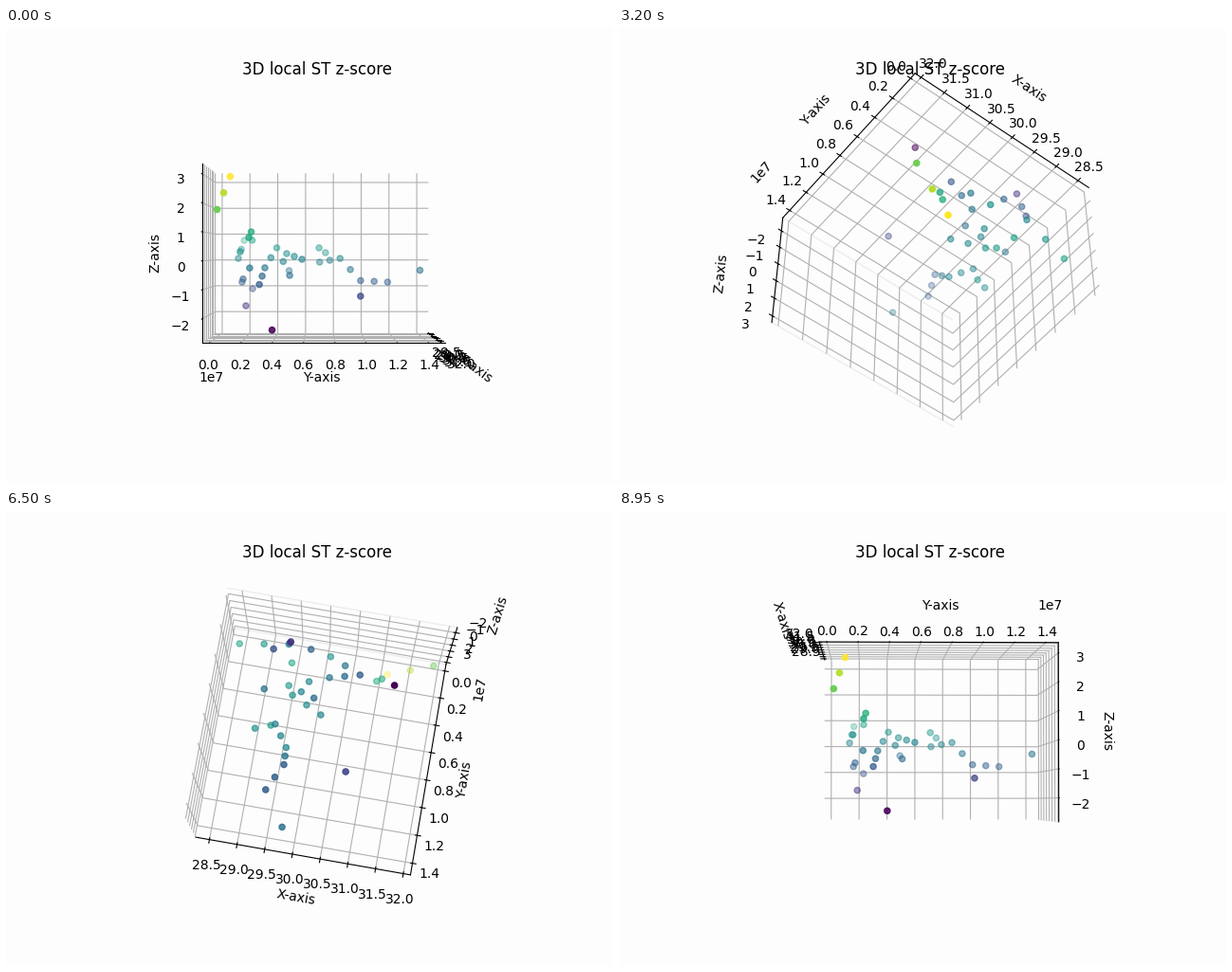
Write a matplotlib script that moves like this. It is 640x480 px and loops after 9 s.

```python
import numpy as np
import matplotlib.pyplot as plt
from matplotlib.animation import FuncAnimation
from matplotlib.transforms import IdentityTransform, blended_transform_factory

FRAMES = 180
INTERVAL = 50
PAPER = "#fdfdfd"

# Axis centres and full ranges for x, y, z
MID = np.array([30.19, 0.717e7, 0.268])
RANGE = np.array([3.878, 1.532e7, 6.18])
BOX = np.array([1.1905, 1.1905, 0.8929])


def trail(*keys):
    """Key points of a path, with one more point halfway along each leg."""
    steps = np.arange(0, len(keys) - 0.75, 0.5)
    return np.column_stack([np.interp(steps, range(len(keys)), c)
                            for c in zip(*keys)])


# Offsets from the centre in thousandths of a plot box unit
high_group = trail((524, -524, 218), (284, -470, 393))
core = trail((-524, -431, 70), (-257, -452, -29), (-235, -410, -285),
             (-28, -432, 7), (145, -325, -164), (-12, -301, -78),
             (-221, -243, 28), (-72, -171, -119))
tail = trail((-251, -12, -49), (-173, 98, -29),
             (-163, 208, -148), (-232, 355, -157))
inner = trail((-24, -105, -33), (-191, -189, -3))
outer = trail((-322, -377, -194), (-355, 20, 2))
lone = [(260, -375, 80), (234, -364, 109), (331, -254, -393),
        (-229, -376, 69), (-277, -15, 28), (160, 201, -224),
        (-117, 524, -92)]

offsets = np.vstack([high_group, core, tail, inner, outer, lone])
x, y, z = (MID + offsets / 1000 * RANGE / BOX).T

fig = plt.figure(figsize=(6.4, 4.8), dpi=100, facecolor=PAPER)
ax = fig.add_subplot(projection="3d", facecolor=PAPER)
ax.scatter(x, y, z, c=z, cmap="viridis")

ax.set_title("3D local ST z-score")
ax.set_xlabel("X-axis")
ax.set_ylabel("Y-axis")
ax.set_zlabel("Z-axis")
ax.set_xticks(np.arange(28.5, 32.1, 0.5))
ax.set_yticks(np.arange(8) * 2e6)
ax.set_zticks(np.arange(-2, 4))

low, high = MID - RANGE / 2, MID + RANGE / 2
ax.set_xlim3d(low[0], high[0])
ax.set_ylim3d(low[1], high[1])
ax.set_zlim3d(low[2], high[2])

# The exponent sits on the bottom edge of the figure, left of the plot
ax.yaxis.offsetText.set_transform(
    blended_transform_factory(ax.transAxes, IdentityTransform()))

# Clear panes; only the y pane keeps a faint outline
for axis, edge in ((ax.xaxis, "none"), (ax.yaxis, "0.93"), (ax.zaxis, "none")):
    axis.pane.set_alpha(None)
    axis.pane.set_facecolor("none")
    axis.pane.set_edgecolor(edge)


def update(i):
    angle = (i * 360 / FRAMES + 180) % 360 - 180
    ax.view_init(elev=angle, azim=angle)
    return ()


anim = FuncAnimation(fig, update, frames=FRAMES, interval=INTERVAL,
                     init_func=lambda: update(0), repeat=True,
                     repeat_delay=0, blit=False)
plt.show()
```
